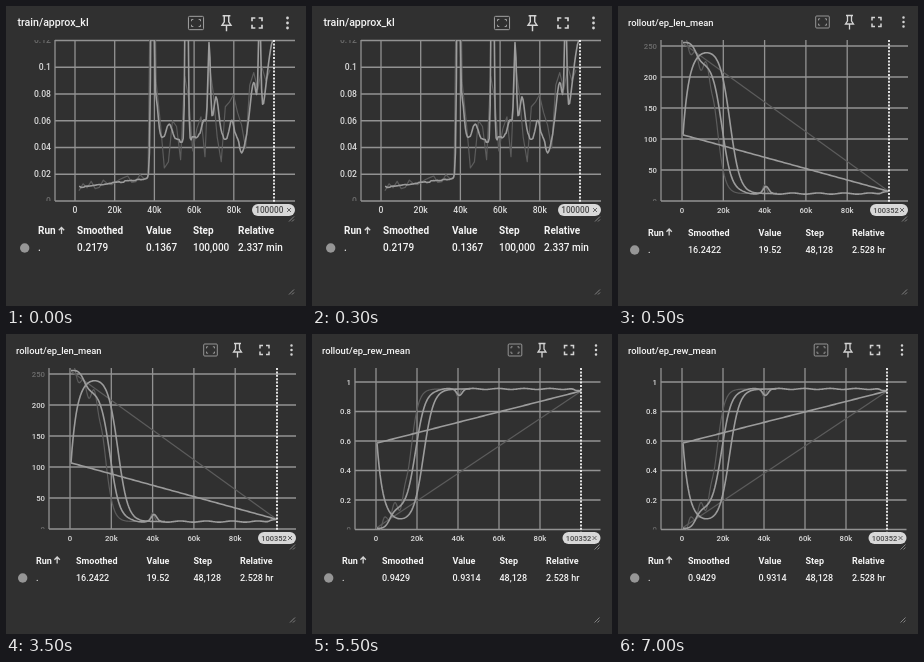
These frames come from a looping animation (300 by 300 pixels, 8 s). An HTML page:

```html
<!DOCTYPE html>
<html lang="en">
<head>
<meta charset="utf-8">
<style>
  html, body { margin: 0; width: 100%; height: 100%; overflow: hidden; background: #303030; }
  svg { display: block; width: 100vw; height: 100vh; font-family: Roboto, sans-serif; }
  .card { visibility: hidden; animation: 8s step-end infinite; }
  .card:nth-of-type(1) { animation-name: first; }
  .card:nth-of-type(2) { animation-name: second; }
  .card:nth-of-type(3) { animation-name: third; }
  @keyframes first { 0% { visibility: visible; } 6.25%, 100% { visibility: hidden; } }
  @keyframes second { 0% { visibility: hidden; } 6.25% { visibility: visible; } 68.75%, 100% { visibility: hidden; } }
  @keyframes third { 0% { visibility: hidden; } 68.75%, 100% { visibility: visible; } }
  text { fill: #f4f4f4; font-weight: 500; }
  .head { font-weight: 700; }
  .tick { fill: #dcdcdc; }
  .faint { opacity: .35; }
  .grid { stroke: #929292; stroke-width: 1.3; fill: none; }
  .curve { fill: none; stroke: #9c9c9c; stroke-width: 1.6; stroke-linejoin: round; }
  .raw { stroke: #5c5c5c; stroke-width: 1.2; }
  .icon { fill: none; stroke: #d4d4d4; stroke-width: 1.3; }
  .dim { stroke: #a0a0a0; stroke-width: .9; }
  .pill { fill: #d8d8d8; }
  .step { fill: #484848; }
  .cross { stroke: #666; }
  .cursor { stroke: #fff; stroke-width: 1.7; stroke-dasharray: 2 1.4; }
  .handle { stroke: #999; stroke-width: .8; }
</style>
</head>
<body>
<svg id="stage" viewBox="0 0 300 300"></svg>
<script>
const END = 100.2; // thousands of steps
const fall = (k, mid, width) => 1 / (1 + Math.exp((k - mid) / width));
const bump = (k, mid, width) => Math.exp(-(((k - mid) / width) ** 2));
const noise = k => { const s = Math.sin(k * 12.9898) * 43758.5453; return s - Math.floor(s) - 0.5; };

// Training progress: 1 is untrained, 0 is settled.
const longRun = k => 0.92 * fall(k, 19.4, 2.4) + 0.13 * fall(k, 6.8, 1.2) +
  0.045 * bump(k, 40.7, 1.8) + 0.016 * fall(-k, -96.5, 0.5) + 0.004 * Math.sin(k / 2);
const shortRun = k => fall(k, 23.2, 2.42) * (1 - 0.59 * Math.exp((0.5 - k) / 2.9));
const rawRun = k => 0.92 * fall(k, 17, 1.9) + 0.13 * fall(k, 5, 0.8) +
  0.05 * Math.sin(k * 1.2) * fall(k, 15, 1) + 0.06 * bump(k, 40, 1.2);
const line = (from, to) => k => from + (to - from) * k / END;

// Each peak: position, height, width.
const peaks = [
  [39, 0.25, 0.8], [40.8, 0.03, 1.5], [47.5, 0.013, 2], [56.2, 0.25, 0.8],
  [65, 0.015, 2], [67.6, 0.07, 0.9], [71, 0.03, 2], [79, 0.014, 1.5],
  [84, -0.01, 1.5], [90, 0.04, 2.5], [93, 0.08, 0.8], [100, 0.075, 5]
];
const divergence = k => {
  const late = fall(-k, -37.6, 0.3);
  return (0.01 + 0.00018 * k) * (1 - late) + 0.046 * late +
    peaks.reduce((sum, [mid, height, width]) => sum + height * bump(k, mid, width), 0) +
    noise(Math.round(k / 2)) * (0.001 + 0.003 * late);
};
const rawDivergence = k => divergence(k) + noise(k) * (k < 38 ? 0.007 : 0.06);

// Each curve: function, first and last position, sampling step, class.
const runs = scale => [
  [rawRun, 0.5, 46, 0.5, 'raw'], [line(1.05, 0.015), 0, END, END, 'raw'],
  [line(0.41, 0.015), 0.5, END, 1, ''], [shortRun, 0.5, 46, 0.5, ''], [longRun, 0.5, END, 0.5, '']
].map(([f, ...rest]) => [k => scale(f(k)), ...rest]);

const compact = {
  size: 9, titleX: 10, titleSize: 9.4, iconGap: 27, iconY: 16, left: 43,
  x0: 64, pillWidth: 38, step: '100352', columns: [30, 70, 140.5, 187.5, 234], headY: 229.5, rowY: 247
};
const cards = [
  {
    title: 'train/approx_kl', size: 10, titleX: 11.5, titleSize: 10.6, iconX: 190, iconGap: 30.5, iconY: 17,
    left: 49, right: 289, x0: 69, dx: 39.7, cursor: 268, zero: 195, dy: 26.75, unit: 0.02, ticks: 6,
    pillWidth: 43, step: '100000', columns: [32, 71, 140, 187, 232], headY: 228, rowY: 245,
    row: ['.', '0.2179', '0.1367', '100,000', '2.337 min'],
    curves: [[rawDivergence, 2, END, 2.048, 'raw'], [divergence, 2, END, 0.5, '']]
  },
  {
    ...compact, title: 'rollout/ep_len_mean', iconX: 204.5, right: 290, dx: 41.3, cursor: 271,
    zero: 195, dy: 31, unit: 50, ticks: 5,
    row: ['.', '16.2422', '19.52', '48,128', '2.528 hr'], curves: runs(level => 12 + 232 * level)
  },
  {
    ...compact, title: 'rollout/ep_rew_mean', iconX: 203, right: 288.5, dx: 41, cursor: 269,
    zero: 195.5, dy: 29.5, unit: 0.2, ticks: 5,
    row: ['.', '0.9429', '0.9314', '48,128', '2.528 hr'], curves: runs(level => 0.953 - 0.899 * level)
  }
];

const TOP = 34;
const range = n => Array.from({ length: n }, (_, i) => i);
const text = (cls, x, y, size, label, anchor = 'start') =>
  `<text class="${cls}" x="${x}" y="${y}" font-size="${size}" text-anchor="${anchor}">${label}</text>`;

function curve(c, [f, from, to, step, cls]) {
  const points = range(Math.floor((to - from) / step + 1e-6) + 1).map(i => {
    const k = from + i * step;
    return `${(c.x0 + k * c.dx / 20).toFixed(2)},${(c.zero - f(k) / c.unit * c.dy).toFixed(2)}`;
  });
  return `<polyline class="curve ${cls}" points="${points.join(' ')}"/>`;
}

const corners = (w, h, n) =>
  `M${-w} ${n - h}V${-h}H${n - w}M${w - n} ${-h}H${w}V${n - h}M${w} ${h - n}V${h}H${w - n}M${n - w} ${h}H${-w}V${h - n}`;

const glyphs = [
  `<g class="dim"><rect x="-6.8" y="-6" width="13.6" height="12" rx="1"/><path d="${corners(4, 3.2, 1.6)}"/></g>`,
  '<path d="M-3.5-6.5H3.5M-2-6V-1L-4 2H4L2-1V-6M0 2V7.5"/>',
  `<path stroke-width="1.5" d="${corners(4.5, 4.5, 3)}"/>`,
  '<path stroke-width="2.5" stroke-linecap="round" d="M0-4.5h.01M0 0h.01M0 4.5h.01"/>'
];

function card(c, id) {
  const { left, right, zero, size, columns } = c;
  const tickSize = size * 0.86;
  const xs = range(5).map(i => c.x0 + i * c.dx);
  const ys = range(c.ticks + 1).map(i => zero - i * c.dy);
  const grid = xs.map(x => `M${x} ${TOP}V${zero}`).join('') + ys.map(y => `M${left} ${y}H${right}`).join('');
  const xTicks = xs.map((x, i) => text('tick', x, 206.5, tickSize, i ? i * 20 + 'k' : '0', 'middle')).join('');
  const yTicks = ys.map((y, i) =>
    text(i === 0 || y < TOP + 8 ? 'tick faint' : 'tick', left - 4, y + 2.8, tickSize, +(i * c.unit).toFixed(2), 'end')).join('');
  const icons = glyphs.map((glyph, i) =>
    `<g class="icon" transform="translate(${c.iconX + i * c.iconGap} ${c.iconY}) scale(${size / 9})">${glyph}</g>`).join('');
  const table = ['Run', 'Smoothed', 'Value', 'Step', 'Relative'].map((name, i) =>
    text('head', columns[i], c.headY, size, name) + text('', columns[i], c.rowY, size, c.row[i])).join('');
  const arrow = `M${columns[0] + size * 2.35} ${c.headY}v-6.5m-2.7 2.7l2.7-2.7l2.7 2.7`;
  const handles = [213.5, 286.5].map(y => `M${right - 6} ${y + 2}l5-5m-2 5l2-2`).join('');
  const pillX = right - c.pillWidth;
  return `<g class="card">
    <clipPath id="plot${id}"><rect x="${left}" y="${TOP}" width="${right - left}" height="${zero - TOP}"/></clipPath>
    <clipPath id="axis${id}"><rect y="${TOP}" width="${left}" height="${zero - TOP}"/></clipPath>
    ${text('', c.titleX, 20, c.titleSize, c.title)}${icons}
    <path class="grid" d="${grid}M${left} ${TOP}V${zero}"/>
    <g clip-path="url(#axis${id})">${yTicks}</g>${xTicks}
    <g clip-path="url(#plot${id})">${c.curves.map(item => curve(c, item)).join('')}</g>
    <path class="cursor" d="M${c.cursor} ${TOP}V${zero + 2}"/>
    <rect class="pill" x="${pillX}" y="198" width="${c.pillWidth}" height="12" rx="6"/>
    ${text('step', pillX + 3.2, 207, size * 0.83, c.step)}
    <path class="cross" d="M${right - 8} 202l4 4m0-4l-4 4"/>
    <circle cx="${columns[0] - 13.3}" cy="${c.rowY - 3}" r="4.7" fill="#969696"/>
    ${table}<path class="icon" stroke-width="1.2" d="${arrow}"/><path class="handle" d="${handles}"/>
  </g>`;
}

document.getElementById('stage').innerHTML = cards.map(card).join('');
</script>
</body>
</html>
```
